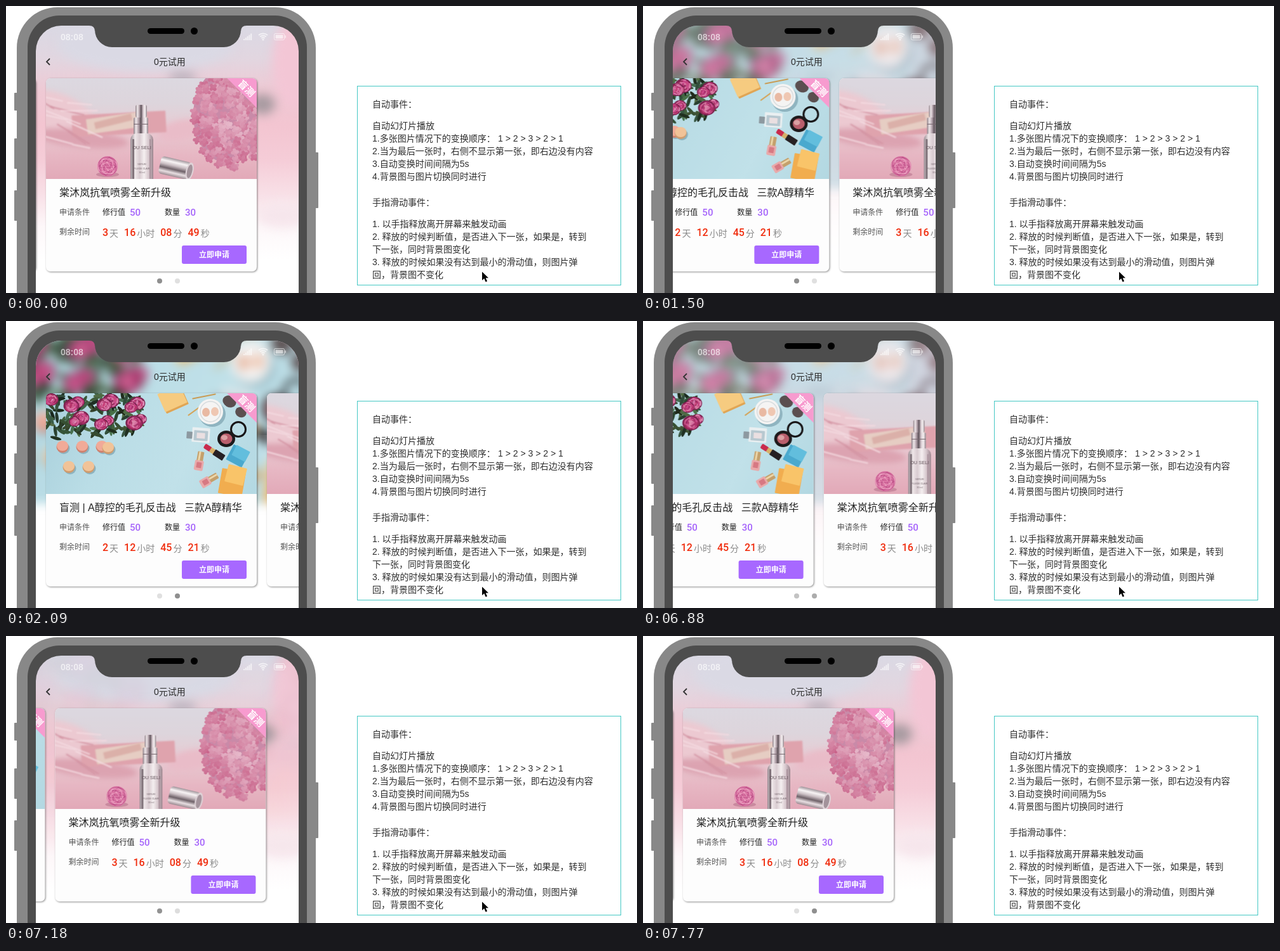
An HTML page with a canvas that plays this animation: 994 px wide and 453 px high, repeating every 8000 ms.

```html
<!DOCTYPE html>
<html lang="zh-CN">
<head>
<meta charset="utf-8">
<title>0元试用</title>
<style>
html, body { margin: 0; width: 100%; height: 100%; overflow: hidden; background: #fff; }
canvas { display: block; }
</style>
</head>
<body>
<canvas id="stage" width="994" height="453"></canvas>
<script>
const ctx = document.getElementById('stage').getContext('2d');
const SANS = '"Liberation Sans", "Noto Sans CJK SC", "Noto Sans CJK", sans-serif';
const DIGITS = 'Roboto, sans-serif';
const LOOP = 8000, CARD_W = 332, CARD_GAP = 348, IMG_H = 159;

/* Motion: both slides share one easing and are shown in ticks of 148 ms */

const TICK = 148, SLIDE = 890, GO = 980, BACK = 6480;
const SHOWN = [6880, 1350];

const clamp = v => Math.min(1, Math.max(0, v));
const ease = u => u < .5 ? 4 * u ** 3 : 1 - 4 * (1 - u) ** 3;
const span = (t, from, length) => clamp((t - from) / length);
const slide = (t, from) => ease(span(t, from, SLIDE));

function snap(t) {
  const from = SHOWN.find(s => t >= s);
  return from ? from + Math.floor((t - from) / TICK) * TICK : 0;
}

function pose(time) {
  const t = snap(time);
  const back = slide(t, BACK);
  const moved = slide(t, GO) - back;
  const second = span(t, 1860, 220) * (1 - back) + span(t, 7380, 220);
  return {
    moved, second,
    cursor: t < 7700 && [750 + 10 * span(t, 7472, TICK), 419 + 7 * span(t, 7300, TICK)]
  };
}

/* Drawing helpers */

function random(seed) {
  return () => (seed = (seed * 16807) % 2147483647) / 2147483647;
}

function layer(w, h, paint) {
  const c = document.createElement('canvas');
  c.width = w;
  c.height = h;
  paint(c.getContext('2d'));
  return c;
}

function text(g, str, x, y, size, color, weight = 500, align = 'left', family = SANS) {
  g.font = `${weight} ${size}px ${family}`;
  g.fillStyle = color;
  g.textAlign = align;
  g.fillText(str, x, y);
  return x + g.measureText(str).width;
}

const digits = (g, str, x, y, size, color) => text(g, str, x, y, size, color, 500, 'left', DIGITS);

function box(g, x, y, w, h, r, color) {
  g.fillStyle = color;
  g.beginPath();
  g.roundRect(x, y, w, h, r);
  g.fill();
}

function oval(g, x, y, rx, ry, color, turn = 0) {
  g.fillStyle = color;
  g.beginPath();
  g.ellipse(x, y, rx, ry, turn, 0, 7);
  g.fill();
}

function ring(g, x, y, r, color, width) {
  g.strokeStyle = color;
  g.lineWidth = width;
  g.beginPath();
  g.arc(x, y, r, 0, 7);
  g.stroke();
}

function ramp(g, x0, y0, x1, y1, ...colors) {
  const f = g.createLinearGradient(x0, y0, x1, y1);
  colors.forEach((c, i) => f.addColorStop(i / (colors.length - 1), c));
  return f;
}

function turned(g, x, y, deg, paint) {
  g.save();
  g.translate(x, y);
  g.rotate(deg * Math.PI / 180);
  paint();
  g.restore();
}

function tile(g, x, y, deg, w, h, color) {
  turned(g, x, y, deg, () => box(g, -w / 2, -h / 2, w, h, 1, color));
}

const metal = (g, x, w) => ramp(g, x, 0, x + w, 0,
  '#8b7c84', '#f1eaec', '#b7a6ae', '#5f535a', '#d7c9cf', '#f7f2f3', '#8e7f87');

/* Card photos */

function hydrangea(g) {
  const rnd = random(77);
  oval(g, 287, 58, 55, 76, '#c98aa8');
  for (let i = 0; i < 300; i++) {
    const a = rnd() * 6.28, r = Math.sqrt(rnd());
    const x = 291 + Math.cos(a) * r * 60, y = 62 + Math.sin(a) * r * 80;
    const light = 80 - r * 9 - rnd() * 13, spin = rnd() * 1.6;
    for (let k = 0; k < 4; k++) {
      const p = spin + k * 1.57;
      oval(g, x + Math.cos(p) * 3, y + Math.sin(p) * 3, 3.6, 2.8, `hsl(337 48% ${light + k}%)`, p);
    }
  }
}

function wickerBall(g, x, y) {
  oval(g, x, y + 13, 18, 4, '#c98a9f');
  oval(g, x, y, 16, 16, '#dc76a5');
  for (let i = 0; i < 9; i++) {
    g.strokeStyle = i % 2 ? '#f0a9c6' : '#bf5289';
    g.lineWidth = 1;
    g.beginPath();
    g.ellipse(x, y, 15, 2 + i * 1.4, i * .9, 0, 7);
    g.stroke();
  }
}

function bottle(g, x) {
  box(g, x - 10, 42, 18, 20, 3, metal(g, x - 10, 18));
  box(g, x - 13, 62, 23, 27, 2, metal(g, x - 13, 23));
  box(g, x - 13, 72, 23, 1, 0, '#78686f');
  box(g, x - 18, 87, 36, 80, [10, 10, 0, 0],
    ramp(g, x - 18, 0, x + 18, 0, '#978a91', '#efe7e9', '#d9ccd1', '#f5eff0', '#d6c6cc', '#9b858e'));
  box(g, x - 15, 96, 3, 63, 1, '#81747b');
  box(g, x + 12, 96, 2, 63, 1, '#ab949e');
  text(g, 'OU SELI', x, 112, 7.5, '#65565d', 400, 'center');
  ['SERUM', 'FLUIDE CLAIR', '30 ml'].forEach((s, i) =>
    text(g, s, x, 137 + i * 6.5, 3.7, '#75666d', 400, 'center'));
}

const serumPhoto = layer(CARD_W, IMG_H, g => {
  g.fillStyle = ramp(g, 0, 0, 0, IMG_H, '#dcd8e0', '#ddd5dc', '#e8cbd3', '#e7b8c4', '#e2a9b8');
  g.fillRect(0, 0, CARD_W, IMG_H);

  // crumpled wrap and envelope
  g.filter = 'blur(4px)';
  oval(g, 20, 55, 62, 30, '#ecc9d1', .4);
  oval(g, 55, 95, 75, 14, '#dca3b1', .1);
  oval(g, 215, 82, 40, 16, '#e9bcc8', -.2);
  g.filter = 'blur(1px)';
  tile(g, 115, 72, -3, 148, 34, '#dfa3ad');
  tile(g, 112, 70, -8, 96, 24, '#e6cdc3');
  tile(g, 106, 68, -14, 60, 11, '#dbb0a9');
  const rnd = random(9);
  for (let i = 0; i < 12; i++) {
    const x = rnd() * 70, y = 25 + rnd() * 85;
    tile(g, x, y, rnd() * 50 - 10, 25 + rnd() * 40, 2, i % 3 ? '#f4dbe1' : '#d495a4');
  }
  g.filter = 'none';

  hydrangea(g);
  wickerBall(g, 97, 139);
  bottle(g, 151);

  // loose cap
  turned(g, 205, 141, 13, () => {
    box(g, -26, -13, 48, 28, 5,
      ramp(g, 0, -13, 0, 15, '#a0959b', '#f8f4f5', '#c9bdc2', '#6f6269', '#e8dfe2', '#9c8b92'));
    oval(g, 22, 1, 6, 14, '#dfd3d8');
    oval(g, 22, 1, 4, 11, '#a3939b');
  });
});

function bouquet(g) {
  const rnd = random(31);
  for (let i = 0; i < 130; i++) {
    const x = rnd() * 150, y = rnd() * (76 - x * .1);
    oval(g, x, y, 9, 2.6, `hsl(${95 + rnd() * 50} 22% ${12 + rnd() * 26}%)`, rnd() * 6);
  }
  for (let i = 0; i < 13; i++) {
    const x = 8 + (i * 47) % 146, y = 10 + (i * 29) % 56, r = 9 + rnd() * 6;
    oval(g, x, y, r, r * .85, '#7d2350');
    for (let k = 0; k < 26; k++) {
      const a = k * 2.4, d = r * (1 - k / 28) * .75;
      oval(g, x + Math.cos(a) * d, y + Math.sin(a) * d * .9, r * .32, r * .15,
        `hsl(${328 + rnd() * 8} 55% ${36 + rnd() * 36}%)`, a + 1.57);
    }
  }
}

function macaron(g, x, y, hue) {
  oval(g, x + 2, y + 3, 9.5, 9, '#8db3bf');
  oval(g, x, y + 1, 9.5, 9, `hsl(${hue} 50% 62%)`);
  oval(g, x, y - 1, 9, 8, `hsl(${hue} 76% 77%)`);
}

function polish(g, x, y, deg) {
  turned(g, x, y, deg, () => {
    box(g, -5, -15, 10, 15, 1, '#c4a06c');
    box(g, -3, -15, 3, 15, 0, '#ecd6a9');
    box(g, -7, -1, 14, 16, 2, '#e9a9aa');
    box(g, -4, 2, 8, 9, 1, '#d77983');
  });
}

const bouquetPhoto = layer(CARD_W, IMG_H, g => {
  g.fillStyle = ramp(g, 0, 0, CARD_W, IMG_H, '#a8cfdb', '#badde6', '#c1e1e9', '#b3d8e2');
  g.fillRect(0, 0, CARD_W, IMG_H);
  bouquet(g);

  for (let i = 0; i < 6; i++) {
    const row = i % 2;
    macaron(g, 26 + (i >> 1) * 31 + row * 10, 84 + row * 32 - (i === 5 ? 30 : 0), 12 + (i * 17) % 34);
  }

  // notebook and pencils
  tile(g, 201, 10, -24, 38, 32, '#e0a554');
  tile(g, 199, 8, -24, 38, 31, '#f6cb80');
  tile(g, 235, 27, -36, 28, 2, '#d4a55b');
  tile(g, 249, 5, -11, 38, 2, '#c99c55');

  // cup and sunglasses
  oval(g, 262, 33, 21, 20, '#8fb4c0');
  oval(g, 259, 29, 20, 20, '#f5f4f3');
  ring(g, 259, 29, 16, '#d6dbdd', 1.5);
  oval(g, 252, 30, 6, 7, '#e9b9a2');
  oval(g, 266, 29, 6, 7, '#efc7b2');
  oval(g, 289, 13, 11, 9, '#5b4f50', .5);
  oval(g, 307, 30, 9, 8, '#5b4f50', .5);

  // perfume
  tile(g, 244, 66, 4, 28, 23, '#e9eff1');
  tile(g, 244, 67, 4, 22, 16, '#b7c8d0');
  tile(g, 244, 67, 4, 13, 9, '#eadfe1');
  tile(g, 226, 66, 4, 9, 11, '#8d99a0');

  // compact
  ring(g, 303, 57, 11.5, '#171517', 3);
  oval(g, 284, 72, 14, 13, '#1d191b');
  oval(g, 284, 72, 9.5, 8.5, '#b95e6c');
  oval(g, 281, 70, 5, 4, '#dba0a3');

  // sticky notes
  tile(g, 302, 99, 28, 28, 27, '#4aa9ce');
  tile(g, 307, 95, 28, 24, 18, '#62bedd');
  tile(g, 293, 141, 10, 38, 40, '#f1ad4f');
  tile(g, 299, 129, 14, 30, 28, '#f9c469');

  // lipstick and nail polish
  turned(g, 264, 92, 33, () => {
    box(g, -17, -4, 12, 8, 2, '#c92a4c');
    box(g, -6, -4, 8, 8, 1, '#d6b06a');
    box(g, 1, -5, 18, 10, 1, '#262023');
  });
  polish(g, 242, 107, 10);
  polish(g, 257, 137, 60);
});

/* Backdrops: soft washes behind the cards */

const pinkBack = layer(994, 453, g => {
  g.fillStyle = ramp(g, 0, 30, 0, 453,
    '#dad9e4', '#e2d6e0', '#efc9d4', '#f3c5d1', '#f5ccd7', '#f8dfe6', '#fdf7f9', '#fff', '#fff');
  g.fillRect(47, 30, 414, 423);
  g.filter = 'blur(8px)';
  oval(g, 455, 90, 36, 70, '#f3c6d5');
  oval(g, 220, 60, 140, 44, '#dad9e4');
  oval(g, 278, 112, 22, 8, '#b7b0bb');
  oval(g, 404, 155, 20, 16, '#a79aa0');
  oval(g, 436, 330, 40, 20, '#f6e6ec');
});

const blueBack = layer(994, 453, g => {
  g.fillStyle = '#fff';
  g.fillRect(47, 30, 414, 423);
  g.filter = 'blur(8px)';
  g.drawImage(bouquetPhoto, -33, 14, 537, 274);
  g.filter = 'none';
  g.fillStyle = ramp(g, 396, 0, 461, 0, 'rgba(255,255,255,0)', 'rgba(255,255,255,.6)');
  g.fillRect(396, 180, 65, 120);
});

/* Cards */

const cards = [
  { photo: bouquetPhoto, title: ['盲测', ' | ', 'A醇控的毛孔反击战', '   ', '三款A醇精华'], clock: ['2', '12', '45', '21'] },
  { photo: serumPhoto, title: ['棠沐岚抗氧喷雾全新升级'], clock: ['3', '16', '08', '49'] }
];

function drawCard(card, x) {
  const g = ctx, w = CARD_W;
  g.save();
  g.translate(x, 114);
  g.shadowColor = 'rgba(0,0,0,.45)';
  g.shadowBlur = 3;
  g.shadowOffsetX = g.shadowOffsetY = 1;
  box(g, 0, 0, w, 305, 7, '#fdfdfd');
  g.shadowColor = 'transparent';

  g.save();
  g.beginPath();
  g.roundRect(0, 0, w, IMG_H, [7, 7, 0, 0]);
  g.clip();
  g.drawImage(card.photo, 0, 0);
  turned(g, w, 0, 45, () => {
    box(g, -50, -50, 100, 83, 0, '#f79bcf');
    text(g, '盲测', 0, 28, 15, '#fff', 'bold', 'center');
  });
  g.restore();

  card.title.reduce((tx, part) => text(g, part, tx, 186, 16, '#222'), 21);
  text(g, '申请条件', 21, 216, 12, '#555');
  text(g, '修行值', 89, 216, 12, '#222');
  digits(g, '50', 132, 217, 15, '#a564fb');
  text(g, '数量', 187, 216, 12, '#222');
  digits(g, '30', 219, 217, 15, '#a564fb');
  text(g, '剩余时间', 21, 247, 12, '#555');
  ['天', '小时', '分', '秒'].reduce((tx, unit, i) => {
    const end = digits(g, card.clock[i], tx, 249, 16, '#f02c0d');
    return text(g, unit, end + 2, 250, 14, '#8a8a8a') + 9;
  }, 89);
  box(g, 214, 264, 102, 29, 3, '#a768ff');
  text(g, '立即申请', 265, 283, 12, '#fff', 'bold', 'center');
  g.restore();
}

/* Phone */

function drawStatus() {
  const g = ctx, pale = 'rgba(255,255,255,.62)';
  text(g, '08:08', 86, 53.5, 14, pale, 'bold');
  for (let i = 0; i < 5; i++) box(g, 374 + i * 2.8, 52 - i * 2.1, 2, 2 + i * 2.1, 0, pale);
  g.strokeStyle = pale;
  g.lineWidth = 2;
  for (let r = 4; r < 11; r += 3.3) {
    g.beginPath();
    g.arc(405, 54, r, -2.3, -.84);
    g.stroke();
  }
  oval(g, 405, 53, 1.6, 1.6, pale);
  g.lineWidth = 1;
  g.beginPath();
  g.roundRect(422.5, 43.5, 16, 10, 2);
  g.stroke();
  box(g, 424.5, 45.5, 12, 6, 1, pale);
  box(g, 439.5, 46.5, 1.5, 4, 0, pale);
  g.strokeStyle = '#333';
  g.lineWidth = 1.8;
  g.beginPath();
  g.moveTo(69, 83);
  g.lineTo(64, 88);
  g.lineTo(69, 93);
  g.stroke();
  text(g, '0元试用', 233, 93, 14, '#2c2c2c');
}

function drawBody() {
  const g = ctx, grey = '#888';
  box(g, 13, 137, 8, 28, 1, grey);
  box(g, 13, 209, 8, 48, 1, grey);
  box(g, 13, 291, 8, 48, 1, grey);
  box(g, 484, 231, 8, 88, 1, grey);
  box(g, 17, 2, 471, 600, 64, grey);
  box(g, 34, 15, 440, 600, 50, '#4d4d4d');
}

function drawNotch() {
  const g = ctx;
  box(g, 140, 15, 230, 50, [0, 0, 27, 27], '#4d4d4d');
  for (const side of [-1, 1]) {
    const x = 255 + side * 115;
    g.beginPath();
    g.moveTo(x, 29);
    g.lineTo(x + side * 9, 31);
    g.quadraticCurveTo(x, 31, x, 40);
    g.fill();
  }
  box(g, 223, 35, 58, 9, 4.5, '#000');
  oval(g, 296.5, 39.5, 5.5, 5.5, '#000');
}

/* Notes panel */

const notes = [
  { top: 160, lines: ['自动事件：'] },
  { top: 194, lines: ['自动幻灯片播放', '1.多张图片情况下的变换顺序：',
    '2.当为最后一张时，右侧不显示第一张，即右边没有内容', '3.自动变换时间间隔为5s', '4.背景图与图片切换同时进行'] },
  { top: 315, lines: ['手指滑动事件：'] },
  { top: 349, lines: ['1. 以手指释放离开屏幕来触发动画', '2. 释放的时候判断值，是否进入下一张，如果是，转到',
    '下一张，同时背景图变化', '3. 释放的时候如果没有达到最小的滑动值，则图片弹', '回，背景图不变化'] }
];

function drawNotes() {
  ctx.strokeStyle = '#45c8c4';
  ctx.lineWidth = 1;
  ctx.strokeRect(553.5, 126.5, 415, 314);
  for (const { top, lines } of notes) {
    lines.forEach((str, i) => text(ctx, str, 577, top + i * 20, 14, '#2e2e2e'));
  }
  text(ctx, '1 > 2 > 3 > 2 > 1', 775, 214, 14, '#2e2e2e');
}

const arrow = new Path2D('M0 0V13.5L3.2 10.6L5.6 16L8 15L5.7 9.8H10Z');

function drawCursor(x, y) {
  ctx.save();
  ctx.translate(x, y + .5);
  ctx.lineJoin = 'round';
  ctx.lineWidth = 2.4;
  ctx.strokeStyle = '#fff';
  ctx.stroke(arrow);
  ctx.fillStyle = '#000';
  ctx.fill(arrow);
  ctx.restore();
}

function dot(x, active) {
  const v = Math.round(224 - 81 * active);
  oval(ctx, x, 434, 4, 4, `rgb(${v},${v},${v})`);
}

function draw(time) {
  const { moved, second, cursor } = pose(time % LOOP);
  const g = ctx;
  g.fillStyle = '#fff';
  g.fillRect(0, 0, 994, 453);
  drawBody();

  g.save();
  g.beginPath();
  g.roundRect(47, 31, 414, 600, 40);
  g.clip();
  g.drawImage(pinkBack, 0, 0);
  g.globalAlpha = moved;
  g.drawImage(blueBack, 0, 0);
  g.globalAlpha = 1;
  drawStatus();
  cards.forEach((card, i) => drawCard(card, 63 + CARD_GAP * (moved + i - 1)));
  dot(242, 1 - second);
  dot(270, second);
  g.restore();

  drawNotch();
  drawNotes();
  if (cursor) drawCursor(...cursor);
}

const start = performance.now();
function tick() {
  draw(performance.now() - start);
  requestAnimationFrame(tick);
}
tick();
</script>
</body>
</html>
```
